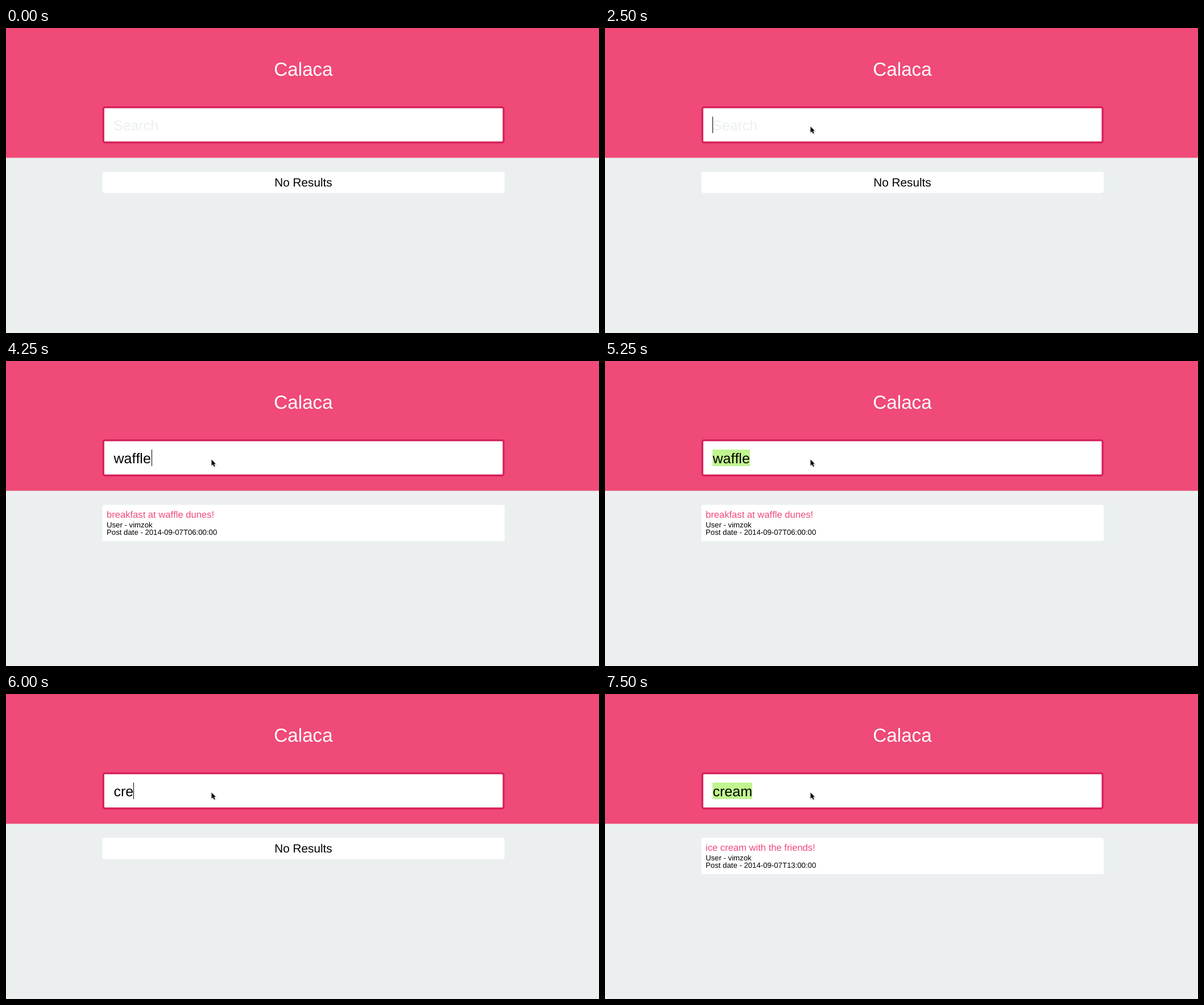
An HTML page that plays this animation: 1043 by 537 pixels, repeating every 8000 ms.

```html
<!DOCTYPE html>
<html lang="en">
<head>
<meta charset="utf-8">
<title>Search demo</title>
<style>
  html, body { margin: 0; width: 100%; height: 100%; overflow: hidden; background: #ebeff0; }
  svg { display: block; }
  text {
    font-family: "Liberation Sans", Arial, sans-serif;
    font-kerning: none;
    font-variant-ligatures: none;
    text-rendering: geometricPrecision;
  }
  .query { font-size: 25px; }
  .heading { font-size: 16.6px; fill: #ef4a78; }
  .detail { font-size: 13.2px; }
</style>
</head>
<body>
<svg width="1043" height="537" viewBox="0 0 1043 537">
  <rect width="1043" height="537" fill="#ebeff0"/>
  <rect width="1043" height="228.5" fill="#ef4a78"/>
  <text x="523" y="84" font-size="33.2" fill="#fff" text-anchor="middle">Calaca</text>

  <rect x="171.2" y="139.7" width="704" height="61.8" rx="2.8" fill="#fff" stroke="#d6205a" stroke-width="3.3"/>
  <rect id="selection" x="189" y="156" height="29" fill="#c0f58f"/>
  <text id="placeholder" class="query" x="189" y="180" fill="#ebeff0">Search</text>
  <text id="query" class="query" x="189.5" y="180"></text>
  <rect id="caret" y="156" width="1" height="29"/>

  <g id="empty">
    <rect x="169.5" y="253.3" width="707.5" height="37.2" rx="4" fill="#fff"/>
    <text x="523" y="279" font-size="20.75" text-anchor="middle">No Results</text>
  </g>
  <g id="result">
    <path d="M169.5 317V257.3a4 4 0 0 1 4-4H873a4 4 0 0 1 4 4V317Z" fill="#fff"/>
    <text id="heading" class="heading" x="177" y="275.6"></text>
    <text class="detail" x="177" y="293">User - vimzok</text>
    <text id="posted" class="detail" x="177" y="305.8"></text>
  </g>

  <g id="pointer">
    <path d="M2 2.5V13.2L4.5 10.9L6.4 15L8.2 14.2L6.4 10.3H9.5Z" fill="#000" stroke="#000" stroke-width="1.6" opacity=".16"/>
    <path d="M1.5 1.5V12.2L4 9.9L5.9 14L7.7 13.2L5.9 9.3H9Z" stroke="#fff" stroke-width="1.6" stroke-linejoin="round" paint-order="stroke"/>
  </g>
</svg>
<script>
const LOOP = 8000;
const el = id => document.getElementById(id);

// Pointer stops: time, x, y
const stops = [
  [250, 475, 32], [500, 425, 129], [750, 382, 153], [1000, 373, 160], [1750, 360, 172]
];

const posts = {
  waffle: ["breakfast at waffle dunes!", "06"],
  cream: ["ice cream with the friends!", "13"]
};

// Field states: time, text, caret x (0 hides it), selection width
const states = [
  [0, "", 0, 0],
  [2500, "", 189, 0],
  [3000, "", 0, 0],
  [3500, "w", 208, 0],
  [3750, "waf", 229, 0],
  [4000, "waff", 237, 0],
  [4250, "waffle", 256, 0],
  [4750, "waffle", 0, 0],
  [5250, "waffle", 0, 66],
  [5750, "c", 202, 0],
  [6000, "cre", 224, 0],
  [6250, "cream", 259, 0],
  [6750, "cream", 0, 0],
  [7250, "cream", 0, 70]
];

const latest = (list, t) => list.filter(item => item[0] <= t).pop();
const show = (id, on) => el(id).setAttribute("visibility", on ? "visible" : "hidden");

function draw(t) {
  const stop = latest(stops, t);
  show("pointer", stop);
  if (stop) el("pointer").setAttribute("transform", `translate(${stop[1]} ${stop[2]})`);

  const [, text, caret, selected] = latest(states, t);
  el("query").textContent = text;
  show("placeholder", !text);
  show("caret", caret);
  el("caret").setAttribute("x", caret);
  el("selection").setAttribute("width", selected);

  const post = posts[text];
  show("empty", !post);
  show("result", post);
  if (post) {
    el("heading").textContent = post[0];
    el("posted").textContent = `Post date - 2014-09-07T${post[1]}:00:00`;
  }
}

const start = performance.now();
function tick() {
  draw((performance.now() - start) % LOOP);
  requestAnimationFrame(tick);
}
tick();
</script>
</body>
</html>
```
